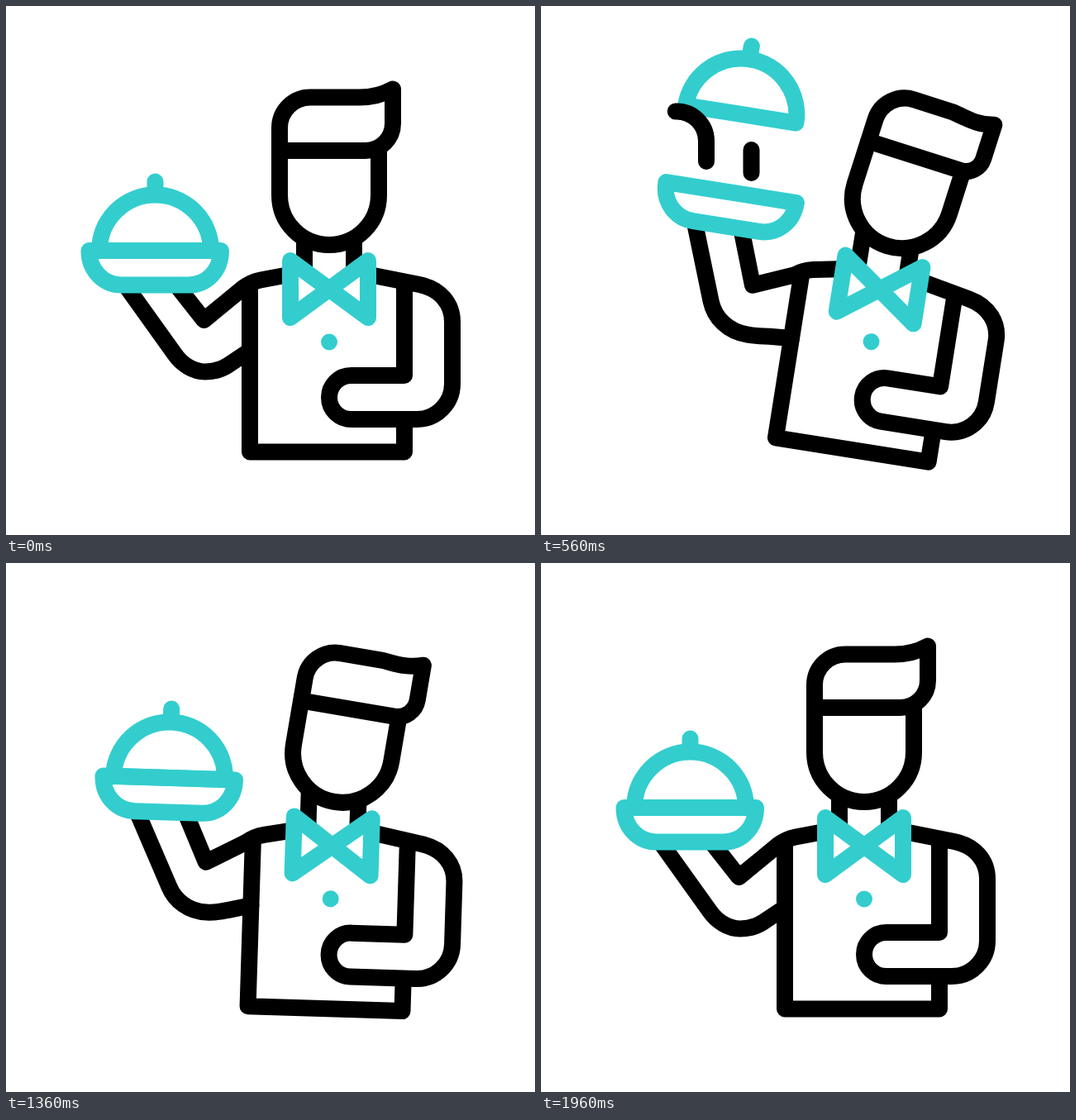
These frames come from a looping animation (640 px wide and 640 px high, 2 s). An HTML page:

```html
<!DOCTYPE html>
<html lang="en">
<head>
<meta charset="utf-8">
<title>Waiter</title>
<style>
  html, body { margin: 0; width: 100%; height: 100%; overflow: hidden; background: #fff; }
  svg { display: block; width: 100vw; height: 100vh; }
  path { fill: none; stroke: #000; stroke-width: 20; stroke-linejoin: round; }
  .teal path { stroke: #33cdce; }
  .teal circle { fill: #33cdce; }
  .round { stroke-linecap: round; }
  #face { fill: #fff; }
</style>
</head>
<body>
<svg viewBox="0 0 640 640">
  <g id="body">
    <path d="M482 500V539.5H295V337"/>
    <path d="M442 325.500L500 337C525 342 540 360 540 382V457A43 43 0 0 1 497 500H417.500A26.500 26.500 0 0 1 417.500 447H482V338"/>
    <path id="armIn" class="round"/>
    <path id="armOut" class="round"/>
    <path d="M361 270V316M421 270V316"/>
    <g id="head">
      <path id="face" d="M331 175V229A60 60 0 0 0 451 229V175"/>
      <path id="hair"/>
    </g>
    <g class="teal">
      <path d="M344 308L438 377V308L344 377Z"/>
      <circle cx="391" cy="406.500" r="10"/>
      <g id="plate">
        <path d="M100.500 296H260C260 320 243 337.500 221 337.500H140C118 337.500 100.500 320 100.500 296Z"/>
        <g id="lid">
          <path d="M113 296A67.500 67.500 0 0 1 248 296Z"/>
          <path class="round" d="M180.500 212.500V228"/>
        </g>
      </g>
    </g>
  </g>
  <path id="steamL" class="round" pathLength="1" d="M200 188V163.500A36 36 0 0 0 164 127.500A36 36 0 0 1 128.500 91.500V64"/>
  <path id="steamR" class="round" pathLength="1" d="M254.500 202V163.500A36 36 0 0 1 290.500 127.500A36 36 0 0 0 327.500 91.500V53"/>
</svg>
<script>
const LOOP = 2000, STEP = 40;
const $ = id => document.getElementById(id);
const ease = t => 0.5 - 0.5 * Math.cos(Math.PI * t);

// Each track lists [time, value]; values ease between neighbours.
const tracks = {
  lean:   [[40, 0], [340, 9], [1155, 9], [1480, -1.3], [1750, 0]],
  raise:  [[168, 0], [460, 1], [1260, 1], [1540, 0]],
  open:   [[162, 0], [460, 1], [1050, 1], [1345, 0]],
  nod:    [[240, 0], [540, 8.7], [1330, 8.7], [1520, -5], [1770, 0]],
  flop:   [[270, 0], [560, 1], [1310, 1], [1520, -0.6], [1700, 0]],
  headL:  [[440, 0], [680, 1]],
  tailL:  [[640, 0], [890, 1]],
  headR:  [[500, 0], [740, 1]],
  tailR:  [[700, 0], [940, 1]]
};

function at(track, t) {
  let [t0, v0] = track[0];
  for (const [t1, v1] of track) {
    if (t < t1) return t <= t0 ? v0 : v0 + (v1 - v0) * ease((t - t0) / (t1 - t0));
    t0 = t1;
    v0 = v1;
  }
  return v0;
}

// Blend two paths that share the same commands; arc flags must stay plain 0 or 1.
function blend(a, b, k) {
  const to = b.match(/-?[\d.]+/g);
  let i = 0;
  return a.replace(/-?[\d.]+/g, n => +(+n + (to[i++] - n) * k).toFixed(2));
}

const hair = [
  "M331 175V147A37 37 0 0 1 368 110.5H428C441 110.5 456 107 468 100.5V142A33 33 0 0 1 435 175Z",
  "M331 175V147A37 37 0 0 1 368 110.5H418C434 112 449 117 470 110V153A22 22 0 0 1 448 175Z"
];
const armIn = [
  "M340 325.5L308 331.5Q296 334 287 341L239.5 380L208 340",
  "M340 325.5L308 331.5Q296 334 287 341L238.5 361.5L215 298"
];
const armOut = [
  "M146 340L204 421C213 434 227 442.5 241 442.5C251 442.5 260 440 268 435L295 417",
  "M158 299L192 389C199 407 217 421.5 242 421.5C252 421.5 260 420.5 268 419.5L295 417.5"
];

function steam(el, tail, head) {
  el.style.display = head > 0 && tail < 1 ? "" : "none";
  el.setAttribute("stroke-dasharray", `${Math.max(head - tail, 0.001)} 3`);
  el.setAttribute("stroke-dashoffset", -tail);
}

const move = (id, value) => $(id).setAttribute("transform", value);
const shape = (id, [a, b], k) => $(id).setAttribute("d", blend(a, b, k));

function draw(t) {
  const v = {};
  for (const key in tracks) v[key] = at(tracks[key], t);
  move("body", `rotate(${v.lean} 397.5 460.6)`);
  move("head", `rotate(${v.nod} 391 294)`);
  move("plate", `translate(${15.2 * v.raise} ${-41.4 * v.raise})`);
  move("lid", `translate(${-3.6 * v.open} ${-95.2 * v.open})`);
  shape("hair", hair, v.flop);
  shape("armIn", armIn, v.raise);
  shape("armOut", armOut, v.raise);
  steam($("steamL"), v.tailL, v.headL);
  steam($("steamR"), v.tailR, v.headR);
}

const start = performance.now();
function tick() {
  const t = (performance.now() - start) % LOOP;
  draw(Math.floor(t / STEP) * STEP);
  requestAnimationFrame(tick);
}
tick();
</script>
</body>
</html>
```
